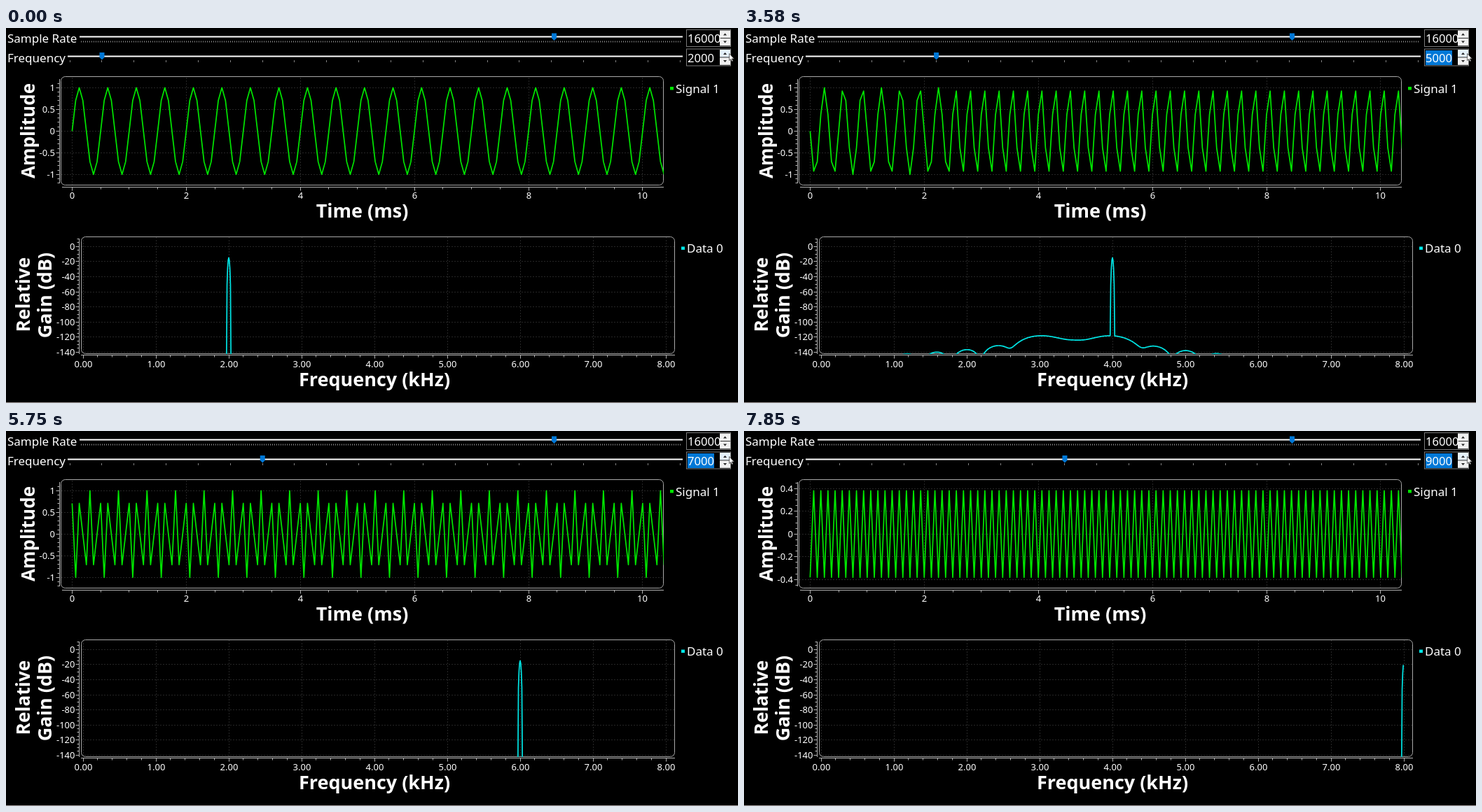
These frames come from a looping animation (1045 by 536 pixels, 8 s). An HTML page:

```html
<!DOCTYPE html>
<html lang="en">
<head>
<meta charset="utf-8">
<title>Signal and spectrum</title>
<style>
html, body { margin: 0; width: 100%; height: 100%; overflow: hidden; background: #000; }
svg { display: block; width: 1045px; height: 536px; font-family: "Noto Sans", "Open Sans", sans-serif; fill: #fff; }
.label { font-size: 17px; }
.spin { font-size: 16.6px; }
.tick { font-size: 13px; }
.title { font-size: 27px; font-weight: 700; text-anchor: middle; }
.line { fill: none; stroke: #b4b4b4; }
.grid { fill: none; stroke: #262626; stroke-dasharray: 2 2; }
.frame { fill: none; stroke: #a8a8a8; }
.curve { fill: none; stroke-width: 1.7; stroke-linejoin: round; }
</style>
</head>
<body>
<svg id="stage" viewBox="0 0 1045 536">
  <defs>
    <clipPath id="timeClip"><rect x="79" y="70" width="860" height="155"/></clipPath>
    <clipPath id="freqClip"><rect x="108" y="299" width="847" height="167"/></clipPath>
  </defs>
  <rect width="1045" height="536" fill="#000"/>
  <rect y="535" width="1045" height="1" fill="#a39c9c"/>
  <g id="fixed"></g>
  <g id="ampAxis"></g>
  <path id="wave" class="curve" stroke="#00e600" clip-path="url(#timeClip)"/>
  <path id="spectrum" class="curve" stroke="#00e6e6" clip-path="url(#freqClip)"/>
  <path id="knob" d="M-3.5 35h7v7l-3.5 3.5l-3.5-3.5z" fill="#0078d7"/>
  <rect id="selection" x="973" y="32" width="38" height="21" fill="#0078d7"/>
  <text id="value" class="spin" x="973" y="49"></text>
  <rect id="caret" x="973" y="31" width="1" height="22" fill="#ff8728"/>
  <circle id="halo" cx="1029.5" cy="38" r="10.3" fill="#f0dc00"/>
  <path d="M1032.5 36.5v10l2.3-2.1l1.6 3.4l1.5-.7l-1.6-3.2h3z" fill="#fff" stroke="#333" stroke-width=".7"/>
</svg>
<script>
const LOOP = 8000, RATE = 16, FFT_SIZE = 2048;
const $ = id => document.getElementById(id);

// Frequencies in kHz, phase in degrees; the frequency switches at sample `cut`.
const scene = (at, from, phase, cut = 0, to = from, peak = 1) => ({ at, from, phase, cut, to, peak });
const scenes = [
  scene(0, 2, 0),
  scene(2240, 2, 0, 7, 3),
  scene(2740, 3, 180),
  scene(3250, 3, 180, 39, 4),
  scene(3730, 4, 22.5, 0, 4, Math.sin(Math.PI * 3 / 8)),
  scene(4240, 4, 22.5, 22, 5),
  scene(4750, 5, 247.5),
  scene(5250, 5, 247.5, 53, 6),
  scene(5750, 6, 135),
  scene(6270, 6, 135, 68, 7),
  scene(6800, 7, 45),
  scene(7330, 7, 45, 1, 8),
  scene(7850, 8, 202.5, 0, 8, Math.sin(Math.PI / 8))
];
const clicks = [[860, 1250], [1900, 2210], [3180, 3570], [4200, 4520], [5130, 5480], [6160, 6470], [7190, 7510]];
const blinks = [860, 1360, 1880, 2460, 3000, 3540, 4010, 4540, 5030, 5580, 6120, 6640, 7150, 7670];

const path = (d, cls) => `<path class="${cls}" d="${d}"/>`;
const text = (x, y, s, cls, extra = "") => `<text x="${x}" y="${y}" class="${cls}" ${extra}>${s}</text>`;
const upright = (x, y, s, size) => text(0, 0, s, "title",
  `transform="translate(${x} ${y}) rotate(-90)" style="font-size:${size}px"`);
const half = v => Math.floor(v) + 0.5;
const polyline = points => "M" + points.map(p => p[0].toFixed(2) + " " + p[1].toFixed(2)).join("L");

function bottomAxis(y, left, right, zero, perUnit, minor, major, last, labelY, digits, top, base) {
  let ticks = `M${left} ${y}H${right}`, grid = "", labels = "";
  for (let i = 0; zero + i * minor * perUnit < right; i++) {
    const x = half(zero + i * minor * perUnit), isMajor = i % Math.round(major / minor) === 0;
    ticks += `M${x} ${y}v${isMajor ? 5 : 3}`;
    if (isMajor && i * minor <= last) {
      grid += `M${x} ${top}V${base}`;
      labels += text(x, labelY, (i * minor).toFixed(digits), "tick", 'text-anchor="middle"');
    }
  }
  return path(grid, "grid") + path(ticks, "line") + labels;
}

function leftAxis(x, top, base, zero, perUnit, minor, ratio, left, right, labelX) {
  let ticks = `M${x} ${top}V${base}`, grid = "", labels = "";
  const lowest = Math.ceil((zero - base) / perUnit / minor);
  const highest = Math.floor((zero - top) / perUnit / minor);
  for (let i = lowest; i <= highest; i++) {
    const y = half(zero - i * minor * perUnit), isMajor = i % ratio === 0;
    ticks += `M${x} ${y}h${isMajor ? -5 : -3}`;
    if (isMajor) {
      grid += `M${left} ${y}H${right}`;
      labels += text(labelX, y + 4.5, String(+(i * minor).toFixed(2)), "tick", 'text-anchor="end"');
    }
  }
  return path(grid, "grid") + path(ticks, "line") + labels;
}

function spinBox(y, hover) {
  const button = (top, fill, d) => `<rect x="1019" y="${top}" width="15" height="10.5" fill="${fill}"/>` +
    `<path d="${d}" fill="#222"/>`;
  return `<rect x="971.5" y="${y + .5}" width="63" height="24" fill="#000" stroke="#7a7a7a"/>` +
    button(y + 1.5, hover ? "#e5f1fb" : "#f0f0f0", `M1024 ${y + 8.5}l2.5-3l2.5 3z`) +
    button(y + 12.8, "#f0f0f0", `M1024 ${y + 16.5}l2.5 3l2.5-3z`);
}

function drawFixed() {
  let coarse = "";
  for (let i = 0; i < 20; i++) coarse += `M${half(91 + i * 45.85)} 46v3`;
  $("fixed").innerHTML =
    text(2, 21, "Sample Rate", "label") + text(2, 48.5, "Frequency", "label") +
    '<rect x="105" y="11.5" width="861" height="2"/><rect x="88" y="39.5" width="878" height="2"/>' +
    '<path d="M107 19.5H965" stroke="#909090" stroke-width="2" stroke-dasharray="1 2"/>' +
    `<path d="${coarse}" stroke="#808080"/>` +
    '<path d="M779 7.5h7v7l-3.5 3.5l-3.5-3.5z" fill="#0078d7"/>' +
    spinBox(2, false) + spinBox(29.5, true) + text(973, 21, "16000", "spin") +
    bottomAxis(227.5, 80, 939, 94.4, 81.45, .5, 2, 10, 244, 0, 71, 225) +
    bottomAxis(467.5, 107, 955, 110, 104, .2, 1, 8, 485, 2, 299, 466) +
    leftAxis(104.5, 301, 466, 312.3, 1.0786, 5, 4, 108, 955, 98.5) +
    '<rect class="frame" x="78.5" y="69.5" width="860" height="155" rx="6"/>' +
    '<rect class="frame" x="107.5" y="298.5" width="847" height="167" rx="6"/>' +
    text(508.5, 271, "Time (ms)", "title") + text(526, 512, "Frequency (kHz)", "title") +
    upright(40.5, 147, "Amplitude", 26) + upright(34, 381, "Relative", 26.3) + upright(65, 382, "Gain (dB)", 27) +
    '<rect x="948" y="84" width="5" height="4.5" fill="#00e600"/>' + text(956, 93, "Signal 1", "label") +
    '<rect x="964" y="312.5" width="5" height="4.5" fill="#00e6e6"/>' + text(972, 321, "Data 0", "label");
}

const sample = (s, n) => Math.sin(s.phase * Math.PI / 180 +
  2 * Math.PI * (s.from * Math.min(n, s.cut) + s.to * Math.max(0, n - s.cut)) / RATE);

// Blackman-Harris window
const weight = n => [.35875, -.48829, .14128, -.01168]
  .reduce((sum, a, i) => sum + a * Math.cos(2 * Math.PI * i * n / FFT_SIZE), 0);

function wavePath(s) {
  return polyline(Array.from({ length: 168 }, (_, n) =>
    [94.4 + n * 81.45 / RATE, 147.3 - 62 * sample(s, n) / s.peak]));
}

function spectrumPath(s) {
  const data = Array.from({ length: FFT_SIZE }, (_, n) => sample(s, n) * weight(n));
  const points = [];
  for (let bin = 1; bin < FFT_SIZE / 2; bin++) {
    const c = 2 * Math.cos(2 * Math.PI * bin / FFT_SIZE);
    let a = 0, b = 0;
    for (const v of data) [a, b] = [v + c * a - b, a];
    const power = Math.max(0, a * a + b * b - c * a * b) / FFT_SIZE ** 2;
    points.push([110 + bin * 832 / (FFT_SIZE / 2), 312.3 - 10.786 * Math.log10(power + 1e-16)]);
  }
  return polyline(points);
}

function ampAxis(s) {
  const fine = s.peak < .5;
  return leftAxis(76.5, 73, 222, 147.3, 62 / s.peak, fine ? .05 : .1, fine ? 4 : 5, 79, 939, 70);
}

let shown;
function showScene(s) {
  if (s === shown) return;
  shown = s;
  $("ampAxis").innerHTML = s.axis;
  $("wave").setAttribute("d", s.wave);
  $("spectrum").setAttribute("d", s.spectrum);
}

function haloOpacity(t) {
  const click = clicks.find(([start, end]) => t >= start && t < end);
  if (!click) return 0;
  const fadeIn = .6 + (t - click[0]) / 70 * .4, fadeOut = (click[1] - t) / 80;
  return .75 * Math.min(1, fadeIn, fadeOut);
}

function render(t) {
  showScene(scenes.filter(s => s.at <= t).pop());
  const count = clicks.filter(c => c[0] <= t).length;
  $("knob").setAttribute("transform", `translate(${137 + count * 45.85} 0)`);
  $("value").textContent = 2000 + count * 1000;
  $("selection").setAttribute("opacity", count ? 1 : 0);
  $("caret").setAttribute("opacity", blinks.filter(b => b <= t).length % 2);
  $("halo").setAttribute("opacity", haloOpacity(t));
}

drawFixed();
for (const s of scenes) Object.assign(s, { axis: ampAxis(s), wave: wavePath(s), spectrum: spectrumPath(s) });
const begin = performance.now();
function tick() {
  render((performance.now() - begin) % LOOP);
  requestAnimationFrame(tick);
}
tick();
</script>
</body>
</html>
```
